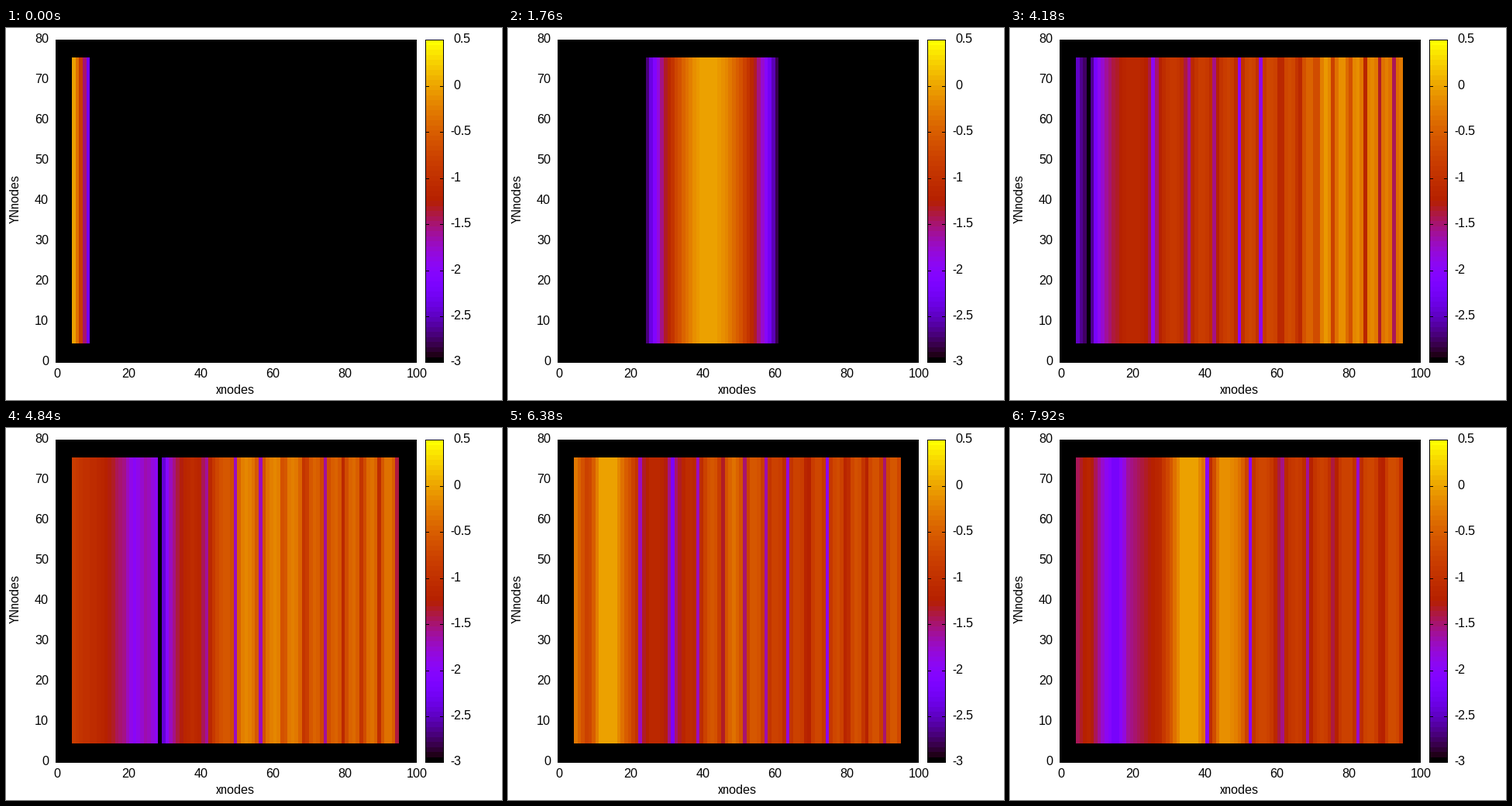
Animation, 640 px wide and 480 px high, one loop 8000 ms. Source, as a matplotlib script:

```python
import numpy as np
import matplotlib.pyplot as plt
from matplotlib.animation import FuncAnimation

W, H, DPI = 640, 480, 100
TICK, HOLD, LOOP = 20, 220, 8000
LEFT, RIGHT, TOP, BOTTOM = 64, 530, 15, 431
VMIN, VMAX, LEVELS = -3.0, 0.5, 64
FIRST, PITCH = 85, 4.637
COLS = np.arange(5, 96)

plt.rcParams["font.family"] = "Liberation Sans"
plt.rcParams["font.size"] = 16 * 72 / DPI
plt.rcParams["text.hinting"] = "default"
plt.rcParams["text.hinting_factor"] = 1


def palette(v):
    """Black-violet-red-yellow ramp in discrete steps."""
    x = (np.asarray(v, float) - VMIN) / (VMAX - VMIN)
    x = np.clip(np.floor(x * LEVELS) / (LEVELS - 1), 0, 1)
    rgb = np.stack([np.sqrt(x), x ** 3, np.sin(2 * np.pi * x)], axis=-1)
    return np.round(255 * np.clip(rgb, 0, 1)).astype(np.uint8)


# Key steps of the scattered wave: packet centre, chirp (start, first
# spacing, power) and the log envelope as (column, value) points.
WAVES = {
    19: (77, (8, 18.25, .6),
         [(5, -2.5), (8, -2.9), (9, -1.35), (18, -1.15), (32, -.9),
          (66, -.65), (74, -.1), (86, -.15), (95, -.3)]),
    25: (36.5, (48.8, 8.3, .8),
         [(5, -2.5), (8.5, -3.2), (11, -2.3), (17, -1.45), (24, -.85),
          (31, -.03), (37, -.65), (42, 0), (50, -.7), (95, -.45)]),
    29: (13, (22.4, 9.45, .826),
         [(5, -.3), (8.5, -.85), (12, -.03), (16, -.03), (22, -.95),
          (34, -1.25), (40, -.7), (49, -.35), (62, -.8), (95, -.55)]),
    36: (40, (41, 12, .78),
         [(5, -1.45), (8, -1.15), (15.5, -2.3), (19, -1.6), (28, -1.1),
          (34, 0), (38, 0), (41, -.5), (45, 0), (60, -.9), (95, -.65)]),
}
KEYS = sorted(WAVES)


def ripple(start, spacing, power):
    """Log amplitude of a chirp with zeros at start + spacing * k**power."""
    k = (np.maximum(COLS - start, 0) / spacing) ** (1 / power)
    wave = np.maximum(.8 * np.log10(np.abs(np.sin(np.pi * k)) + 1e-6), -1.5)
    return np.where(COLS < start, 0, wave)


def envelope(key, shift):
    """Log envelope moved sideways and mirrored at both walls."""
    src = 5 + np.abs(COLS - shift - 5)
    src = 95 - np.abs(95 - src)
    return np.interp(src, *zip(*WAVES[key][2]))


def scattered(n):
    """Travelling envelope and chirp, blended between key steps."""
    i = min(np.searchsorted(KEYS, n, side="right"), len(KEYS) - 1)
    a, b = KEYS[i - 1], KEYS[i]
    w = (n - a) / (b - a)
    (ca, chirp_a, _), (cb, chirp_b, _) = WAVES[a], WAVES[b]
    centre = (1 - w) * ca + w * cb
    level = (1 - w) * envelope(a, centre - ca) + w * envelope(b, centre - cb)
    chirp = (1 - w) * np.array(chirp_a) + w * np.array(chirp_b)
    return level + ripple(*chirp)


def pulse(n):
    """Log amplitude of the incoming pulse, scaled to its largest value."""
    d = COLS - (7 * n - 14)
    front = -.0078 * d ** 2 - .06 * np.maximum(d - 19, 0) ** 2
    v = np.where(d < 0, -.0093 * d ** 2, front)
    return v - v.max()


def field(n):
    if n < 16:
        return pulse(n)
    if n < KEYS[0]:
        # The scattered wave spreads out from the right wall.
        src = 95 - (95 - COLS) * 4 / (n - 15)
        spread = np.interp(src, COLS, scattered(KEYS[0]), left=-9)
        return np.maximum(spread, pulse(n) - (n - 15))
    return scattered(n)


def bar_y(v):
    return int(np.ceil(BOTTOM - (v - VMIN) / (VMAX - VMIN) * (BOTTOM - TOP)))


BAR_TICKS = np.arange(VMIN, VMAX + .1, .5)


def backdrop():
    img = np.full((H, W, 3), 255, np.uint8)
    img[TOP:BOTTOM + 1, LEFT:RIGHT] = 0
    rows = np.arange(TOP, BOTTOM)
    values = VMAX - (rows - TOP + .5) / (BOTTOM - TOP) * (VMAX - VMIN)
    img[TOP:BOTTOM, 541:565] = palette(values)[:, None]
    img[[TOP, BOTTOM], 541:565] = 0
    img[TOP:BOTTOM + 1, [541, 564]] = 0
    for v in BAR_TICKS:
        img[bar_y(v), 541:546] = 0
        img[bar_y(v), 560:565] = 0
    return img


BASE = backdrop()
PX = np.arange(FIRST, 507)
PX_COL = np.clip(((PX - FIRST + .5) / PITCH).astype(int), 0, len(COLS) - 1)


def picture(n):
    img = BASE.copy()
    img[38:407, FIRST:507] = palette(field(n))[PX_COL]
    return img


PICTURES = [picture(n) for n in range((LOOP - 1) // HOLD + 1)]

fig = plt.figure(figsize=(W / DPI, H / DPI), dpi=DPI, facecolor="white")
ax = fig.add_axes([0, 0, 1, 1])
ax.axis("off")
view = ax.imshow(PICTURES[0], extent=(0, W, H, 0), aspect="auto",
                 interpolation="nearest")

for v in range(0, 101, 20):
    ax.text(65.5 + 4.65 * v, 451, str(v), ha="center")
for v in range(0, 81, 10):
    ax.text(55, BOTTOM - 5.2 * v + 4, str(v), ha="right")
for v in BAR_TICKS:
    ax.text(573 if v < 0 else 577.5, bar_y(v) + 4, f"{v:g}")
ax.text(296, 472, "xnodes", ha="center")
ax.text(17, 221, "YNnodes", ha="center", rotation=90,
        rotation_mode="anchor")


def update(i):
    view.set_data(PICTURES[i * TICK // HOLD])
    return [view]


anim = FuncAnimation(fig, update, frames=LOOP // TICK, interval=TICK,
                     repeat=True, repeat_delay=0)
plt.show()
```
